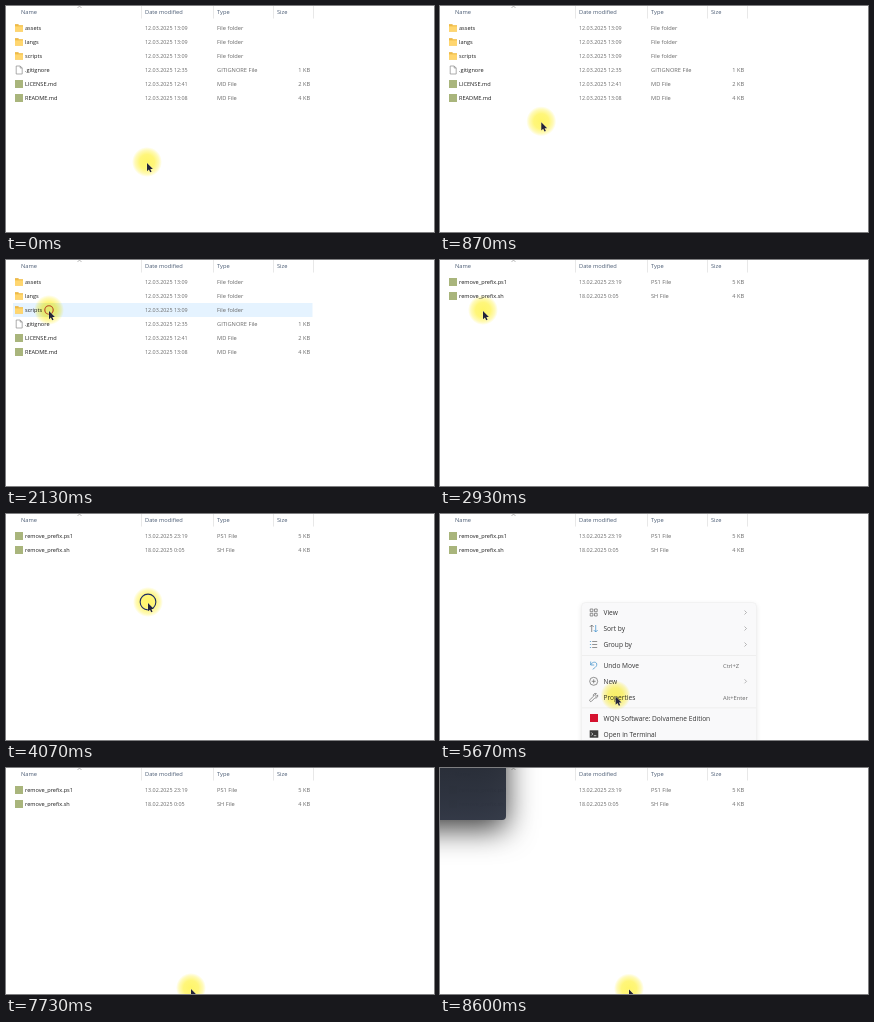
An HTML page with a canvas that plays this animation: 428 px wide and 226 px high, repeating every 8.87 s.

```html
<!DOCTYPE html>
<html lang="en">
<meta charset="utf-8">
<title>Open a terminal in the scripts folder</title>
<style>
html, body { margin: 0; width: 100%; height: 100%; overflow: hidden; background: #fff; }
canvas { display: block; width: 428px; height: 226px; }
</style>
<canvas></canvas>
<script>
const W = 428, H = 226, LOOP = 8870, TICK = 200 / 3;
const OPEN = 2530, MENU_ON = 4260, HOVER = 6060, MENU_OFF = 7720, TERMINAL = 8260;
const FONT = '"Open Sans", "Noto Sans", sans-serif';
const canvas = document.querySelector('canvas'), c = canvas.getContext('2d');
const dpr = window.devicePixelRatio || 1;
canvas.width = W * dpr;
canvas.height = H * dpr;

const ROOT = [
  ['folder', 'assets', '12.03.2025 13:09', 'File folder', ''],
  ['folder', 'langs', '12.03.2025 13:09', 'File folder', ''],
  ['folder', 'scripts', '12.03.2025 13:09', 'File folder', ''],
  ['page', '.gitignore', '12.03.2025 12:35', 'GITIGNORE File', '1 KB'],
  ['note', 'LICENSE.md', '12.03.2025 12:41', 'MD File', '2 KB'],
  ['note', 'README.md', '12.03.2025 13:08', 'MD File', '4 KB']
];
const SCRIPTS = [
  ['note', 'remove_prefix.ps1', '13.02.2025 23:19', 'PS1 File', '5 KB'],
  ['note', 'remove_prefix.sh', '18.02.2025 0:05', 'SH File', '4 KB']
];
// y, label, hint, icon strokes: [path, colour]
const GREY = '#666', BLUE = '#3a8fca';
const ITEMS = [
  [98.5, 'View', '>', ['M-3.5-3.5h2.7v2.7h-2.7zM.8-3.5h2.7v2.7h-2.7zM-3.5 .8h2.7v2.7h-2.7zM.8 .8h2.7v2.7h-2.7z', GREY]],
  [114.5, 'Sort by', '>', ['M-2 3.5v-7l-2 2m2-2l2 2', GREY], ['M2-3.5v7l-2-2m2 2l2-2', BLUE]],
  [130.5, 'Group by', '>', ['M-1.5-3h5M-1.5 0h5M-1.5 3h5', GREY], ['M-3.8-3h1.2M-3.8 0h1.2M-3.8 3h1.2', BLUE]],
  [151.3, 'Undo Move', 'Ctrl+Z', ['M-3-3.8v3.5h3.5M-3-.5c2-4 7-3 6 .5c-.4 1.5-2 2.5-4 4', BLUE]],
  [167.3, 'New', '>', ['M4 0a4 4 0 1 1-8 0a4 4 0 1 1 8 0M-2 0h4M0-2v4', GREY]],
  [183.5, 'Properties', 'Alt+Enter', ['M-3.7 2.2l3.4-3.4c-.6-2 1.2-3.4 3-2.7l-1.6 1.7l1.2 1.2l1.6-1.6c.7 1.8-.8 3.6-2.7 3l-3.4 3.4c-1 1-2.5-.6-1.5-1.6z', GREY]],
  [204, 'WQN Software: Dolvamene Edition', ''],
  [220, 'Open in Terminal', '']
];
// time, x, y of the pointer
const PATH = [
  [0, 141, 156], [400, 141, 156], [870, 101, 115], [1270, 71, 82], [1530, 53, 62],
  [1800, 43, 50], [3000, 43, 50], [3130, 66, 59], [3330, 128, 83], [3470, 142, 88],
  [5330, 142, 88], [5470, 153, 120], [5670, 176, 182.5], [5930, 183, 208],
  [6270, 185, 220], [7800, 185, 220], [8070, 189, 220.5], [LOOP, 189, 220.5]
];

const clamp = v => Math.max(0, Math.min(1, v));
const easeOut = v => 1 - (1 - clamp(v)) ** 3;

function pointer(t) {
  const i = PATH.findIndex(p => p[0] > t), [a, x, y] = PATH[i - 1], [b, u, v] = PATH[i];
  const k = (t - a) / (b - a);
  return [x + (u - x) * k, y + (v - y) * k];
}

function box(x, y, w, h, fill) {
  c.fillStyle = fill;
  c.fillRect(x, y, w, h);
}

function text(s, x, y, size, fill, align = 'left') {
  c.font = size + 'px ' + FONT;
  c.textAlign = align;
  c.fillStyle = fill;
  c.fillText(s, x, y + size * .36);
}

function stroke(path, x, y, color, width = .7) {
  c.save();
  c.translate(x, y);
  c.strokeStyle = color;
  c.lineWidth = width;
  c.stroke(new Path2D(path));
  c.restore();
}

function fileIcon(kind, y) {
  if (kind === 'folder') {
    box(9, y - 3.8, 3.6, 2, '#e9b13b');
    box(9, y - 2.8, 8, 6.4, '#f0bd48');
    box(9, y - 1.6, 8, 5.2, '#ffd66f');
  } else if (kind === 'page') {
    box(10, y - 4, 6.5, 8, '#fff');
    stroke('M-3-4h4l2 2v6h-6zM1-4v2h2', 13.2, y, '#8a8a8a');
  } else {
    box(9, y - 4, 8, 8, '#a9b57c');
  }
}

function explorer(t, py) {
  const rows = t < OPEN ? ROOT : SCRIPTS;
  stroke('M-2 1l2-2l2 2', 73.5, 1, '#8a8a8a', .6);
  [['Name', 15], ['Date modified', 139], ['Type', 211], ['Size', 271]]
    .forEach(([s, x]) => text(s, x, 6.3, 5.7, '#4c5d75'));
  for (const x of [135, 207, 267, 307]) box(x, 0, 1, 12.5, '#e8e8e8');
  rows.forEach(([kind, name, date, type, size], i) => {
    const y = 22 + 14 * i;
    if (t < OPEN && Math.abs(py - y) <= 7) box(7, y - 7, 299.5, 14, '#e5f3ff');
    fileIcon(kind, y);
    text(name, 19, y, 5.6, '#1c1c1c');
    text(date, 139, y, 5.4, '#6a6a6a');
    text(type, 211, y, 5.7, '#686868');
    text(size, 304, y, 5.6, '#686868', 'right');
  });
}

function menu(t) {
  if (t < MENU_ON || t >= MENU_OFF) return;
  c.save();
  c.globalAlpha = clamp((MENU_OFF - t) / 130);
  c.beginPath();
  c.rect(130, 78, 200, 20 + 130 * easeOut((t - MENU_ON + TICK) / 220));
  c.clip();
  c.shadowColor = 'rgba(0,0,0,.1)';
  c.shadowBlur = 5 * dpr;
  c.shadowOffsetY = 1.5 * dpr;
  c.fillStyle = '#f9f9fa';
  c.beginPath();
  c.roundRect(141.5, 88.5, 175, 160, 4);
  c.fill();
  c.shadowColor = 'transparent';
  c.strokeStyle = '#f0f0f0';
  c.lineWidth = .7;
  c.stroke();
  if (t >= HOVER) box(145, 212.5, 168, 14, '#f1f1f1');
  for (const y of [141, 193.5]) box(142, y, 174, .8, '#ececec');
  for (const [y, label, hint, ...icon] of ITEMS) {
    icon.forEach(([path, color]) => stroke(path, 153.7, y, color));
    text(label, 163.5, y + .2, 6.6, '#333');
    if (hint === '>') stroke('M-1-2l2 2l-2 2', 305.5, y, '#888', .6);
    else text(hint, 283, y + .2, 5.8, '#666');
  }
  box(150, 200, 8, 8, '#d5122f');
  box(149.7, 216.3, 8.6, 7.4, '#3a3a3a');
  stroke('M-2.5-1.5l1.5 1.5l-1.5 1.5M0 1.7h2.5', 153.8, 220, '#fff');
  c.restore();
}

function terminal(t) {
  if (t < TERMINAL) return;
  const k = easeOut((t - TERMINAL) / 340), x = 48 + 18 * k, y = 38 + 14 * k;
  c.save();
  c.globalAlpha = .96 * k;
  c.shadowColor = 'rgba(0,0,0,.8)';
  c.shadowBlur = 30 * dpr;
  c.shadowOffsetY = 9 * dpr;
  const g = c.createLinearGradient(0, 0, 0, y);
  g.addColorStop(0, '#292e39');
  g.addColorStop(1, '#313745');
  c.fillStyle = g;
  c.beginPath();
  c.roundRect(-200, -150, 200 + x, 150 + y, 4);
  c.fill();
  c.restore();
}

function glow(x, y) {
  const g = c.createRadialGradient(x, y, 0, x, y, 15);
  g.addColorStop(0, '#fff569');
  g.addColorStop(.5, '#fff67a');
  g.addColorStop(.8, '#fffaba');
  g.addColorStop(1, '#fff');
  c.save();
  c.globalCompositeOperation = 'multiply';
  c.fillStyle = g;
  c.beginPath();
  c.arc(x, y, 15, 0, 7);
  c.fill();
  c.restore();
}

function ring(t, start, x, y, color) {
  const age = t - start;
  if (age < 0 || age > 200) return;
  c.save();
  c.globalAlpha = 1 - clamp((age - 70) / 150);
  c.strokeStyle = color;
  c.lineWidth = 1.1;
  c.beginPath();
  c.arc(x, y, 4 + age / 16, 0, 7);
  c.stroke();
  c.restore();
}

function arrow(x, y) {
  c.save();
  c.translate(x, y);
  const p = new Path2D('M0 0v8.2l1.9-1.7l1.3 2.8l1.4-.6l-1.3-2.7h2.6z');
  c.strokeStyle = 'rgba(255,255,255,.5)';
  c.lineWidth = .6;
  c.stroke(p);
  c.fillStyle = '#23233a';
  c.fill(p);
  c.restore();
}

function draw(t) {
  const [x, y] = pointer(t);
  c.setTransform(dpr, 0, 0, dpr, 0, 0);
  box(0, 0, W, H, '#fff');
  explorer(t, y);
  menu(t);
  terminal(t);
  glow(x, y);
  for (const s of [2130, 2330, 7530]) ring(t, s, x, y, '#b8481f');
  ring(t, 4005, x, y, '#1d2b66');
  arrow(x, y + 1);
}

function frame(now) {
  draw(Math.floor((now % LOOP + 5) / TICK) * TICK % LOOP);
  requestAnimationFrame(frame);
}
requestAnimationFrame(frame);
</script>
</html>
```
